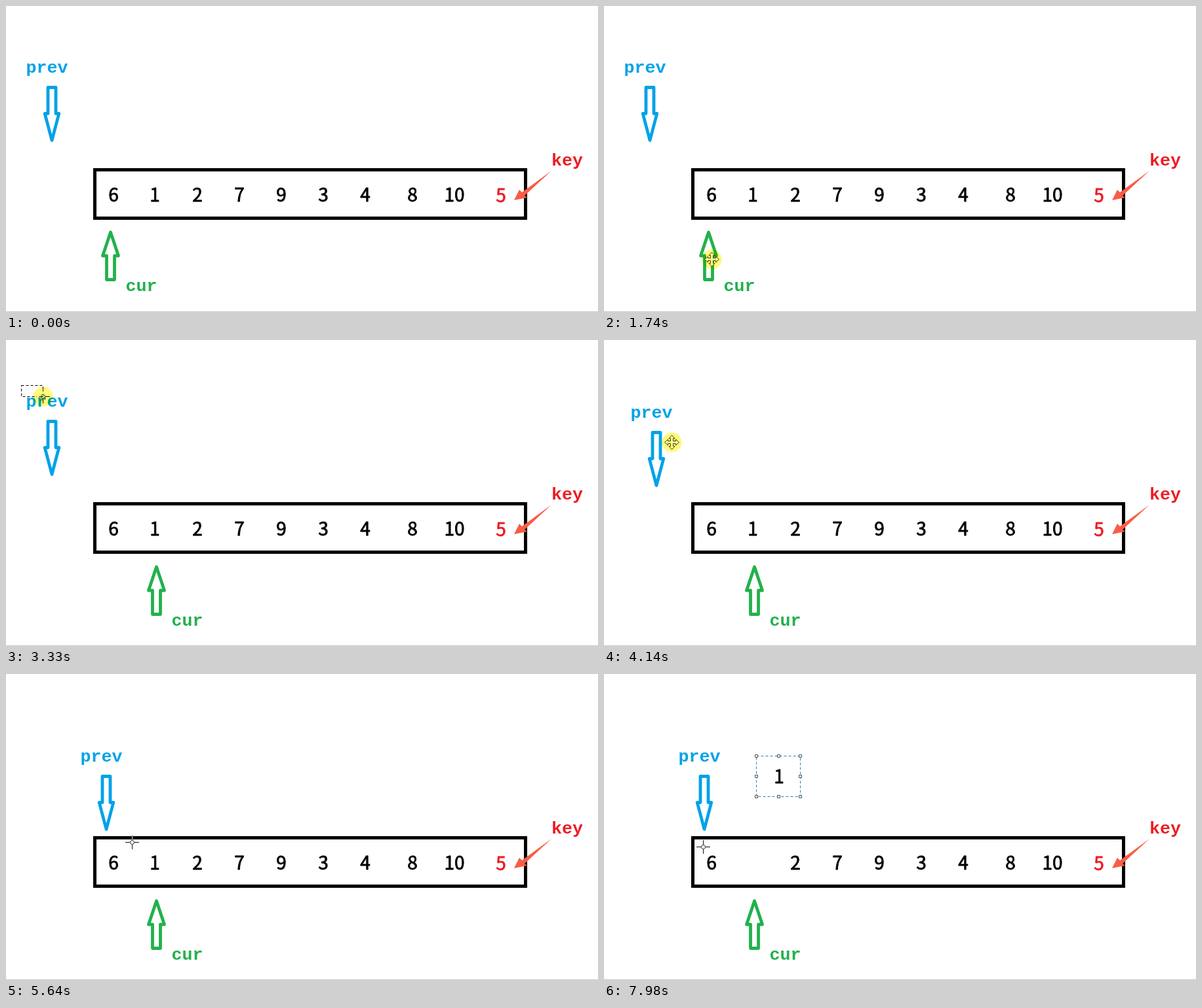
An HTML page with a canvas that plays this animation: 903 by 468 pixels, repeating every 8 s.

```html
<!DOCTYPE html>
<html lang="en">
<head>
<meta charset="utf-8">
<title>prev / cur / key pointers</title>
<style>
  html, body { margin: 0; width: 100%; height: 100%; overflow: hidden; background: #fff; }
  canvas { display: block; }
</style>
</head>
<body>
<canvas id="stage" width="903" height="468"></canvas>
<script>
const ctx = document.getElementById('stage').getContext('2d');
const LOOP = 8000, ENTER = 120;
const SELECT = 390, DRAG = 430, CLICK = 90, TRAVEL = 330, BOW = 21;
const BLUE = '#00a2e8', GREEN = '#22b14c', RED = '#ed1c24';
const LABEL = 'bold 26.67px "Liberation Mono", monospace';
const DIGIT = '28px "Noto Sans CJK SC", "Noto Sans CJK JP", "Noto Sans CJK", sans-serif';

// Select a box, grab it, shift it, let go and click somewhere else
const picks = [
  { draw: drawCur, start: 900, press: 1740, release: 2490, leave: 2790,
    from: [88, 337], size: [159, 120], grab: [164, 387], shift: [70, 1], away: [217, 172] },
  { draw: drawPrev, start: 3300, press: 4050, release: 4950, leave: 5220,
    from: [23, 69], size: [151, 156], grab: [93, 139], shift: [83, 32], away: [389, 174] },
  { draw: drawOne, start: 6270, press: 7140, release: 7590, leave: LOOP,
    from: [192, 257], size: [67, 62], grab: [230, 288], shift: [40, -132], away: [150, 265] }
];

const add = (a, b) => [a[0] + b[0], a[1] + b[1]];
const smooth = u => u * u * (3 - 2 * u);
const curves = {
  glide: u => [smooth(u), smooth(u), 0],
  sweep: u => [1 - (1 - u) ** 3, 1 - (1 - u) ** 1.4, 0],
  drag: u => [smooth(u), smooth(u), BOW * Math.sin(Math.PI * u)]
};

// Mouse stops; the button and curve apply until the next stop
const stop = (t, pos, down = false, curve = 'glide') => ({ t, pos, down, curve });
const stops = [stop(ENTER, [705, 478])];
for (const p of picks) {
  const dropped = add(p.grab, p.shift);
  stops.push(
    stop(p.start, p.from, true, 'sweep'),
    stop(p.start + SELECT, add(p.from, p.size)),
    stop(p.press - 30, p.grab),
    stop(p.press, p.grab, true, 'drag'),
    stop(p.press + DRAG, dropped, true),
    stop(p.release, dropped),
    stop(p.leave, p.away, true),
    stop(p.leave + CLICK, p.away)
  );
  const next = picks[picks.indexOf(p) + 1];
  if (next) stops.push(stop(p.leave + CLICK + TRAVEL, next.from));
}

function mouse(t) {
  const i = stops.findIndex(s => s.t > t);
  if (i < 1) return null;
  const a = stops[i - 1], b = stops[i];
  const [ux, uy, bow] = curves[a.curve]((t - a.t) / (b.t - a.t));
  return {
    x: Math.round(a.pos[0] + (b.pos[0] - a.pos[0]) * ux),
    y: Math.round(a.pos[1] + (b.pos[1] - a.pos[1]) * uy + bow),
    down: a.down
  };
}

const dragging = (p, t) => t >= p.press && t < p.release;

function offset(p, t) {
  if (t < p.press) return [0, 0];
  if (t >= p.release) return p.shift;
  const m = mouse(t);
  return [m.x - p.grab[0], m.y - p.grab[1]];
}

function at([x, y], draw) {
  ctx.save();
  ctx.translate(x, y);
  draw();
  ctx.restore();
}

function shape(points) {
  ctx.beginPath();
  points.forEach(([x, y]) => ctx.lineTo(x, y));
  ctx.closePath();
}

function label(s, x, y, color) {
  ctx.font = LABEL;
  ctx.textAlign = 'left';
  ctx.fillStyle = color;
  ctx.fillText(s, x, y);
}

function digit(s, x, y = 299, color = '#000') {
  ctx.font = DIGIT;
  ctx.textAlign = 'center';
  ctx.fillStyle = ctx.strokeStyle = color;
  ctx.lineWidth = .8;
  ctx.lineJoin = 'round';
  ctx.fillText(s, x, y);
  ctx.strokeText(s, x, y);
}

// Hollow block arrow; dir is 1 for down, -1 for up
function arrow(x, tip, dir, half, head, length, color) {
  const neck = tip - dir * head, end = tip - dir * length;
  shape([[x - 6, end], [x + 6, end], [x + 6, neck], [x + half, neck],
         [x, tip], [x - half, neck], [x - 6, neck]]);
  ctx.strokeStyle = color;
  ctx.lineWidth = 4.8;
  ctx.lineJoin = 'round';
  ctx.stroke();
}

function drawPrev() {
  label('prev', 30.5, 102, BLUE);
  arrow(70, 205.5, 1, 10.8, 41, 81, BLUE);
}

function drawCur() {
  label('cur', 182.5, 435.5, GREEN);
  arrow(159.5, 346, -1, 12, 36, 72.5, GREEN);
}

function drawOne() {
  digit(1, 227);
}

function board() {
  ctx.fillStyle = '#fff';
  ctx.fillRect(0, 0, 903, 468);
  ctx.fillStyle = '#c8c8c8';
  ctx.fillRect(0, 467, 903, 1);
  ctx.strokeStyle = '#000';
  ctx.lineWidth = 5;
  ctx.lineJoin = 'miter';
  ctx.strokeRect(135.5, 250.5, 657, 74);
  ['6', '', '2', '7', '9', '3', '4', '8', '10']
    .forEach((n, i) => digit(n, 164 + 64 * i + (i > 6 ? 8 : 0)));
  digit(5, 755, 300, RED);
  label('key', 832, 244, RED);
  shape([[832, 252], [787, 285], [783, 281], [775, 297], [795, 293], [791, 290]]);
  ctx.fillStyle = '#fa5c46';
  ctx.fill();
}

function dashed(x, y, w, h, color) {
  ctx.strokeStyle = color;
  ctx.lineWidth = 1;
  ctx.setLineDash([4, 3]);
  ctx.strokeRect(x + .5, y + .5, w, h);
  ctx.setLineDash([]);
}

// Returns true when the mouse is over a finished selection
function selection(p, t, m) {
  if (t < p.start || t >= p.leave || dragging(p, t)) return false;
  const [x, y] = add(p.from, offset(p, t)), [w, h] = p.size;
  if (t < p.start + SELECT) {
    dashed(x, y, m.x - x, m.y - y, '#000');
    return false;
  }
  dashed(x, y, w, h, '#2b80bc');
  ctx.strokeStyle = '#555';
  ctx.fillStyle = '#fff';
  for (let i = 0; i < 9; i++) {
    if (i === 4) continue;
    const hx = x + Math.round(w * (i % 3) / 2) - 2;
    const hy = y + Math.round(h * Math.floor(i / 3) / 2) - 2;
    ctx.fillRect(hx, hy, 5, 5);
    ctx.strokeRect(hx + .5, hy + .5, 4, 4);
  }
  return m.x > x + 3 && m.x < x + w - 3 && m.y > y + 3 && m.y < y + h - 3;
}

function crosshair() {
  ctx.globalCompositeOperation = 'difference';
  ctx.strokeStyle = '#eee';
  ctx.beginPath();
  for (const s of [-1, 1]) {
    ctx.moveTo(s * 3.5, 0);
    ctx.lineTo(s * 10.5, 0);
    ctx.moveTo(0, s * 3.5);
    ctx.lineTo(0, s * 10.5);
  }
  ctx.moveTo(3, 0);
  ctx.arc(0, 0, 3, 0, 7);
  ctx.stroke();
}

// One arm, repeated by quarter turns
function moveIcon() {
  const arm = [[-2, -2], [-2, -6], [-4.5, -6], [0, -11], [4.5, -6], [2, -6]];
  const turn = ([x, y]) => [-y, x];
  const points = [];
  for (let i = 0, part = arm; i < 4; i++, part = part.map(turn)) points.push(...part);
  shape(points);
  ctx.fillStyle = '#fff';
  ctx.strokeStyle = '#444';
  ctx.lineJoin = 'miter';
  ctx.fill();
  ctx.stroke();
}

function cursor(m, moving) {
  at([m.x + .5, m.y + .5], () => {
    ctx.lineWidth = 1;
    moving ? moveIcon() : crosshair();
    if (!m.down) return;
    ctx.globalCompositeOperation = 'multiply';
    ctx.fillStyle = '#fffa7c';
    ctx.beginPath();
    ctx.arc(0, 0, 15, 0, 7);
    ctx.fill();
  });
}

function render() {
  const t = performance.now() % LOOP, m = mouse(t);
  board();
  for (const p of picks) at(offset(p, t), p.draw);
  if (m) {
    const over = picks.map(p => selection(p, t, m) || dragging(p, t));
    cursor(m, over.includes(true));
  }
  requestAnimationFrame(render);
}
render();
</script>
</body>
</html>
```
